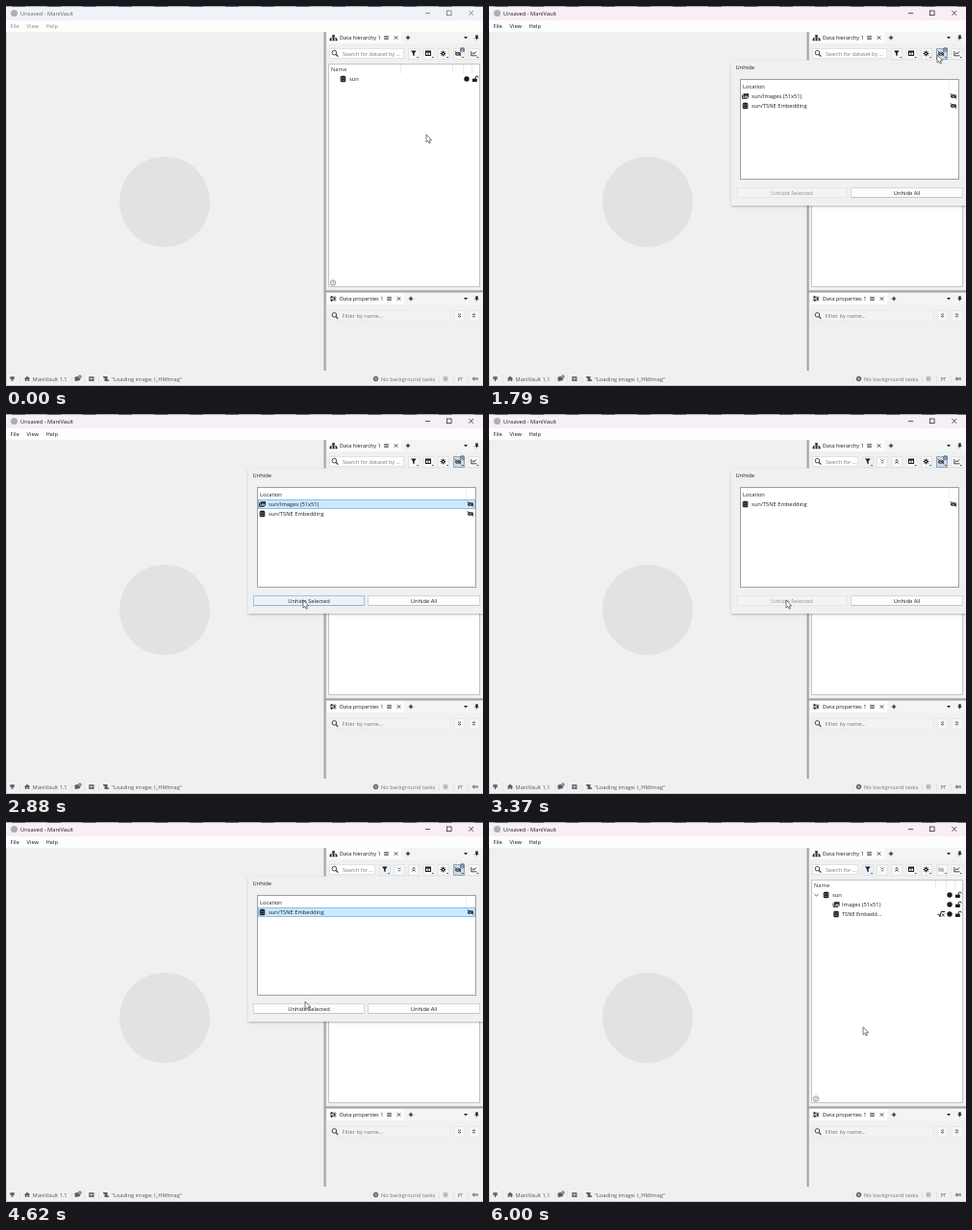
These frames come from a looping animation (496 by 396 pixels, 6.2 s). An HTML page with a canvas:

```html
<!DOCTYPE html>
<html lang="en">
<head>
<meta charset="utf-8">
<title>Unhide datasets</title>
<style>
html, body { margin: 0; width: 100%; height: 100%; overflow: hidden; background: #f0f0f0; }
canvas { display: block; }
</style>
</head>
<body>
<canvas id="stage" width="496" height="396"></canvas>
<script>
const g = document.getElementById('stage').getContext('2d');
const LOOP = 6200, INK = '#1c1c1c', DIM = '#777', BG = '#f0f0f0';

// Moments of the interaction, in ms
const ACTIVATE = 1110, OPEN = 1410, PICK1 = 2380, APPLY1 = 3020,
      PICK2 = 4110, APPLY2 = 4860, CLOSE = 5690, HELP = 5990;

// Pointer stops: time, x, y
const PATH = [
  [70, 437, 134], [690, 460, 72], [1080, 467, 51], [1790, 466, 51],
  [2060, 340, 87], [2250, 313, 95], [2400, 311, 96], [2740, 309, 193],
  [2880, 309, 194], [3370, 309, 194], [3700, 297, 101], [3860, 294, 98],
  [4160, 294, 98], [4620, 311, 187], [4760, 312, 193], [4920, 312, 193],
  [5310, 385, 211], [5450, 389, 213.5]
];

const clamp = v => Math.max(0, Math.min(1, v));
const ease = v => v * v * (3 - 2 * v);

function pointer(t) {
  let a = PATH[0];
  for (const b of PATH) {
    if (t < b[0]) {
      const k = ease(clamp((t - a[0]) / (b[0] - a[0])));
      return [a[1] + (b[1] - a[1]) * k, a[2] + (b[2] - a[2]) * k];
    }
    a = b;
  }
  return a.slice(1);
}

function box(x, y, w, h, fill, line) {
  if (fill) { g.fillStyle = fill; g.fillRect(x, y, w, h); }
  if (line) { g.strokeStyle = line; g.lineWidth = 1; g.strokeRect(x + .5, y + .5, w - 1, h - 1); }
}

function text(s, x, cy, color = INK, size = 5.75, align = 'left', weight = color === INK ? 500 : 400) {
  g.font = `${weight} ${size}px "Open Sans", "Noto Sans", sans-serif`;
  g.textAlign = align;
  g.fillStyle = color;
  g.fillText(s, x, cy + 2.1);
}

function line(pts, color = INK, width = 1) {
  g.beginPath();
  for (let i = 0; i < pts.length; i += 2) g.lineTo(pts[i], pts[i + 1]);
  g.strokeStyle = color;
  g.lineWidth = width;
  g.stroke();
}

function shape(pts, fill) {
  g.beginPath();
  for (let i = 0; i < pts.length; i += 2) g.lineTo(pts[i], pts[i + 1]);
  g.closePath();
  g.fillStyle = fill;
  g.fill();
}

function disc(x, y, r, fill, stroke, width = 1) {
  g.beginPath();
  g.arc(x, y, r, 0, 7);
  if (fill) { g.fillStyle = fill; g.fill(); }
  if (stroke) { g.strokeStyle = stroke; g.lineWidth = width; g.stroke(); }
}

function database(x, y, s = 1, color = INK, gap = '#bbb') {
  g.beginPath();
  g.roundRect(x - 2.8 * s, y - 3.3 * s, 5.6 * s, 6.6 * s, 1.5 * s);
  g.fillStyle = color;
  g.fill();
  for (const d of [-1.4, .9])
    line([x - 2.8 * s, y + d * s, x, y + (d + .7) * s, x + 2.8 * s, y + d * s], gap, .5 * s);
}

function images(x, y) {
  line([x - 3, y - 1.5, x - 3, y + 2.4, x + 2, y + 2.4], INK, .9);
  box(x - 2, y - 2.7, 5.5, 4.2, INK);
  shape([x - 1.2, y + .8, x + .4, y - 1, x + 1.2, y, x + 2, y - .8, x + 3, y + .8], '#ddd');
}

function eye(x, y, color = INK) {
  g.beginPath();
  g.ellipse(x, y, 3, 2, 0, 0, 7);
  g.fillStyle = color;
  g.fill();
  disc(x, y, 1.2, null, '#e4e4e4', .6);
  line([x - 3.2, y - 1.9, x + 2.8, y + 2.9], '#eee', .6);
  line([x - 3.3, y - 2.6, x + 3.3, y + 2.6], color, .9);
}

function gear(x, y, r = 1.9, color = INK) {
  for (let i = 0; i < 4; i++) {
    const c = Math.cos(i * Math.PI / 4) * r * 1.5, s = Math.sin(i * Math.PI / 4) * r * 1.5;
    line([x - c, y - s, x + c, y + s], color, 1);
  }
  disc(x, y, r, color);
  disc(x, y, r * .4, '#fff');
}

function magnifier(x, y) {
  disc(x - .6, y - .6, 2.3, null, '#333', .9);
  line([x + 1.2, y + 1.2, x + 3.3, y + 3.3], '#333', 1.2);
}

function bars(x, y, w, color = INK, gap = 1.8) {
  for (const d of [-gap, 0, gap]) line([x - w / 2, y + d, x + w / 2, y + d], color, .7);
}

function chevrons(x, y, dir, color = INK) {
  for (const d of [-1.2, 1.1])
    line([x - 1.5, y + d - dir * .7, x, y + d + dir * .7, x + 1.5, y + d - dir * .7], color, .9);
}

function lock(x, y) {
  box(x - 3, y - .3, 4.8, 3.3, INK);
  g.beginPath();
  g.arc(x + 1.7, y - 1.4, 1.5, Math.PI, 0);
  g.strokeStyle = INK;
  g.lineWidth = 1;
  g.stroke();
  line([x + .2, y - 1.4, x + .2, y], INK, 1);
}

function tool(x, fill = '#f8f8f8', edge = '#e4e4e4') {
  box(x - 6, 44, 12, 12, fill, edge);
  shape([x + 3, 53, x + 5, 53, x + 4, 54.2], INK);
}

function button(x, w, label, enabled, hover) {
  const fill = hover ? '#eaf3fa' : enabled ? '#fdfdfd' : '#f3f3f3';
  const edge = hover ? '#a3c4de' : enabled ? '#d8d8d8' : '#e8e8e8';
  box(x, 189, w, 11, fill, edge);
  if (enabled) box(x + 1, 199, w - 2, 1, hover ? '#8db4d2' : '#c4c4c4');
  text(label, x + w / 2, 194.5, enabled ? INK : '#8f8f8f', 5.75, 'center');
}

function frameWindow(active) {
  box(0, 0, 496, 396, BG);
  box(0, 0, 496, 15, active ? '#f8eef5' : '#eff3f9');
  box(0, 0, 496, 1, '#a9b0b8');
  for (let x = 6; x < 490; x += 37) box(x, 0, 14, 1, '#626b76');
  disc(8.5, 7.5, 3.5, '#a8b0b5');
  text('Unsaved - ManiVault', 15, 7.5, active ? INK : '#666');
  const c = active ? '#333' : '#777';
  line([436, 7.5, 441, 7.5], c, .8);
  g.strokeStyle = c;
  g.strokeRect(458.5, 5, 4.6, 4.6);
  line([481.5, 5, 486, 9.8], c, .8);
  line([486, 5, 481.5, 9.8], c, .8);

  box(0, 15, 496, 12, '#fdfdfd');
  const m = active ? INK : '#888';
  text('File', 4.5, 20.5, m);
  text('View', 21.5, 20.5, m);
  text('Help', 41.5, 20.5, m);
  disc(165, 204, 47, '#e1e3e2');
  box(330.5, 27, 2.2, 353, '#a5a5a5');
  box(332, 296.3, 164, 2.2, '#a5a5a5');
}

function dockTab(y, label, w) {
  box(334, y - 6, 162, 12, '#f4f4f4');
  box(334, y - 6, w, 12, '#fdfdfd');
  text(label, 347, y, INK, 5.6);
  const x = 334 + w;
  bars(x - 15.5, y, 4.6, INK, 1.4);
  line([x - 7.2, y - 1.7, x - 3.8, y + 1.7], INK, .8);
  line([x - 3.8, y - 1.7, x - 7.2, y + 1.7], INK, .8);
  line([x + 4.8, y, x + 9.2, y], INK, 1.1);
  line([x + 7, y - 2.2, x + 7, y + 2.2], INK, 1.1);
  shape([476, y - 1, 480, y - 1, 478, y + 1.2], INK);
  box(488.3, y - 2.6, 2.4, 2.8, INK);
  line([487.4, y + .5, 491.6, y + .5], INK, .7);
  line([489.5, y, 489.5, y + 2.6], INK, .7);
}

function toolbar(t, expanded) {
  const right = expanded ? 384 : 414;
  box(336, 44, right - 336, 11, '#fff', '#e2e2e2');
  magnifier(342, 49.3);
  text(expanded ? 'Search for ...' : 'Search for dataset by ...', 350, 49.5, DIM, 5.5);

  const fx = expanded ? 394 : 424;
  tool(fx, expanded ? '#e8f1f9' : undefined);
  shape([fx - 3, 46.5, fx + 2.6, 46.5, fx + .6, 49.3, fx + .6, 52.3, fx - .9, 51.3, fx - .9, 49.3], INK);
  if (expanded) {
    box(403, 44, 12, 12, '#f8f8f8', '#e4e4e4');
    box(418, 44, 12, 12, '#f8f8f8', '#e4e4e4');
    chevrons(409, 49.5, 1, '#4a72ad');
    chevrons(424, 49.5, -1);
  }
  tool(439.5);
  box(436, 46.7, 6, 5.3, null, INK);
  box(436, 46.7, 6, 1.8, INK);
  line([439, 47, 439, 52], INK, .8);
  tool(455);
  gear(454.5, 49.5);

  const hidden = t < APPLY1 ? 2 : t < APPLY2 ? 1 : 0;
  const open = t >= ACTIVATE && hidden;
  tool(471, open ? '#cddbe8' : undefined, open ? '#90a7bd' : undefined);
  eye(470, 49.7, hidden ? '#333' : '#a4aebb');
  if (hidden) {
    disc(474.5, 45.7, 2.6, '#71839c');
    text(hidden, 474.5, 45.5, '#fff', 4.2, 'center');
  }
  tool(486.5);
  line([483.8, 47, 483.8, 51.8, 489.5, 51.8], INK, .8);
  line([484.8, 50.3, 486, 48.8, 487.3, 49.6, 489, 47.5], INK, .8);
}

function tree(expanded, hover, help) {
  box(335, 60, 158, 233, '#fff', '#c6c6c6');
  text('Name', 338, 65.5, '#26364c');
  for (const x of expanded ? [464, 475, 484] : [410, 464, 475, 484]) box(x, 61, 1, 9, '#e8e8e8');
  if (hover) box(346, 71, 146, 10, '#e5f3ff');
  database(350.5, 76);
  text('sun', 357, 76);
  if (expanded) {
    line([338.3, 75, 340.5, 77.2, 342.7, 75], '#444', .8);
    images(361, 86);
    text('Images (51x51)', 367, 86);
    database(361, 96);
    text('TSNE Embedd...', 367, 96, INK, 5.6);
    line([466.5, 96.5, 467.7, 96, 469, 98.7, 470.2, 93.5, 474, 93.5], INK, 1);
    line([471, 95.5, 473.5, 98.5], INK, .8);
    line([473.5, 95.5, 471, 98.5], INK, .8);
  }
  for (const y of expanded ? [76, 86, 96] : [76]) {
    disc(479, y, 2.7, INK);
    lock(488, y);
  }
  g.globalAlpha = help;
  disc(340, 288.5, 2.8, '#ededed', '#8a8a8a', .8);
  text('?', 340, 288.4, '#666', 4.5, 'center');
  g.globalAlpha = 1;
}

function properties() {
  dockTab(305, 'Data properties 1', 80);
  bars(340, 305, 6.5);
  for (const [x, y] of [[338.6, 303.2], [341.6, 305], [338.6, 306.8]]) box(x - .6, y - .9, 1.3, 1.8, INK);
  box(336, 317, 126, 11, '#f3f3f3', '#eaeaea');
  magnifier(342, 322.5);
  text('Filter by name...', 349.5, 322.8, DIM);
  for (const [x, d] of [[471.5, 1], [486.5, -1]]) {
    box(x - 6, 317, 12, 12, '#f6f6f6', '#e8e8e8');
    chevrons(x, 322.5, d, '#333');
  }
}

function statusBar() {
  const c = '#5c5c5c', y = 388.5;
  box(0, 395, 496, 1, '#d0d0d0');
  box(0, 27, 1, 369, '#d6d6d6');
  box(4.3, y - 2.3, 4.4, 2.6, c);
  line([6.5, y, 6.5, y + 2.6], c, .9);
  line([4.8, y + 1.2, 8.2, y + 1.2], c, .6);
  shape([18.8, y, 22, y - 2.8, 25.2, y, 24.2, y, 24.2, y + 2.6, 22.6, y + 2.6, 22.6, y + .8,
         21.4, y + .8, 21.4, y + 2.6, 19.8, y + 2.6, 19.8, y], c);
  text('ManiVault 1.1', 27.5, y, '#555', 5.7);
  g.beginPath();
  g.ellipse(74.3, y - .3, 2.9, 2.3, 0, 0, 7);
  g.fillStyle = c;
  g.fill();
  shape([72, y + 1, 71.5, y + 2.8, 74.3, y + 1.8], c);
  disc(76.8, y - 2.2, 2, '#7f96b2');
  box(86.3, y - 2.3, 5.2, 4.8, c);
  line([86.8, y - .2, 91, y - .2], '#ddd', .7);
  line([88.9, y - 1.4, 88.9, y + 2.2], '#ddd', .7);
  shape([101, y - 2.6, 105.5, y - 2.6, 105.5, y + 1, 107.2, y + 1, 106.8, y + 2.5, 102.5, y + 2.5, 102.5, y - 1, 101, y - 1], c);
  text('"Loading image: I_HMImag"', 109.5, y, '#555');
  for (const x of [14, 68, 81, 96, 378, 450, 465, 480]) box(x, 384, 1, 9, '#e4e4e4');
  disc(384.5, y, 2.7, '#666');
  line([383.4, y - 1.1, 385.6, y + 1.1], '#eee', .7);
  line([385.6, y - 1.1, 383.4, y + 1.1], '#eee', .7);
  text('No background tasks', 390, y, DIM);
  bars(457, y, 4.6, '#777', 1.6);
  text('PT', 472.5, y, '#777', 4.6, 'center', 600);
  gear(486.6, y, 1.1, '#777');
  gear(489.6, y, .8, '#777');
}

function popup(t, px, py) {
  const alpha = clamp((t - OPEN) / 120) * clamp(1 - (t - CLOSE) / 170);
  if (!alpha) return;
  g.globalAlpha = alpha;
  g.save();
  g.shadowColor = 'rgba(0,0,0,.4)';
  g.shadowBlur = 3;
  g.shadowOffsetY = 1;
  box(251.5, 56.5, 250, 151.5, BG);
  g.restore();
  text('Unhide', 256.5, 63.5);

  const empty = t >= APPLY2;
  const picked = t >= PICK1 && t < APPLY1 || t >= PICK2 && !empty;
  if (empty) {
    box(261, 76, 228, 105, '#d6d6d6', '#b4b4b4');
    database(375, 124.5, 1.65, '#8d8d8d', '#d6d6d6');
    text('No hidden datasets found', 375, 135, '#7c7c7c', 5.5, 'center', 700);
  } else {
    box(261, 76, 228, 105, '#fff', '#a0a0a0');
    text('Location', 264, 83.5);
    box(478, 78, 1, 10, '#ececec');
    const rows = t < APPLY1 ? ['sun/Images (51x51)', 'sun/TSNE Embedding'] : ['sun/TSNE Embedding'];
    rows.forEach((name, i) => {
      const y = 94 + i * 10;
      const hover = px > 262 && px < 488 && py >= y - 5 && py < y + 5;
      if (picked && !i) box(262, y - 5, 226, 10, '#cce8ff', '#86c2ee');
      else if (hover) box(262, y - 5, 226, 10, '#e5f3ff');
      if (name.includes('Images')) images(266.5, y); else database(266.5, y);
      text(name, 273, y);
      eye(483, y);
    });
  }
  const over = picked && py > 189 && py < 200 && px > 257 && px < 373;
  button(257, 116, 'Unhide Selected', picked, over);
  button(376, 117, 'Unhide All', !empty);
  g.globalAlpha = 1;
}

function cursor(x, y) {
  g.beginPath();
  for (const [dx, dy] of [[0, 0], [0, 8], [1.8, 6.4], [3.1, 9.2], [4.4, 8.6], [3.2, 5.9], [5.6, 5.8]])
    g.lineTo(x + dx, y + dy);
  g.closePath();
  g.fillStyle = '#fff';
  g.fill();
  g.strokeStyle = '#444';
  g.lineWidth = .7;
  g.stroke();
}

function draw(t) {
  const [x, y] = pointer(t);
  const expanded = t >= APPLY1;
  frameWindow(t >= ACTIVATE);
  dockTab(33, 'Data hierarchy 1', 77);
  box(339.2, 30.2, 2.6, 2.2, INK);
  line([337.5, 35, 337.5, 33.3, 343.5, 33.3, 343.5, 35], INK, .7);
  line([340.5, 32, 340.5, 35], INK, .7);
  for (const dx of [336.5, 339.5, 342.5]) box(dx, 34.3, 2, 2, INK);
  toolbar(t, expanded);
  const help = t < OPEN || t >= HELP ? 1 : .5 * clamp((t - CLOSE) / 170);
  tree(expanded, t < OPEN && y >= 71 && y < 81, help);
  properties();
  statusBar();
  popup(t, x, y);
  cursor(x, y);
}

const start = performance.now();
function tick() {
  draw((performance.now() - start) % LOOP);
  requestAnimationFrame(tick);
}
tick();
</script>
</body>
</html>
```
